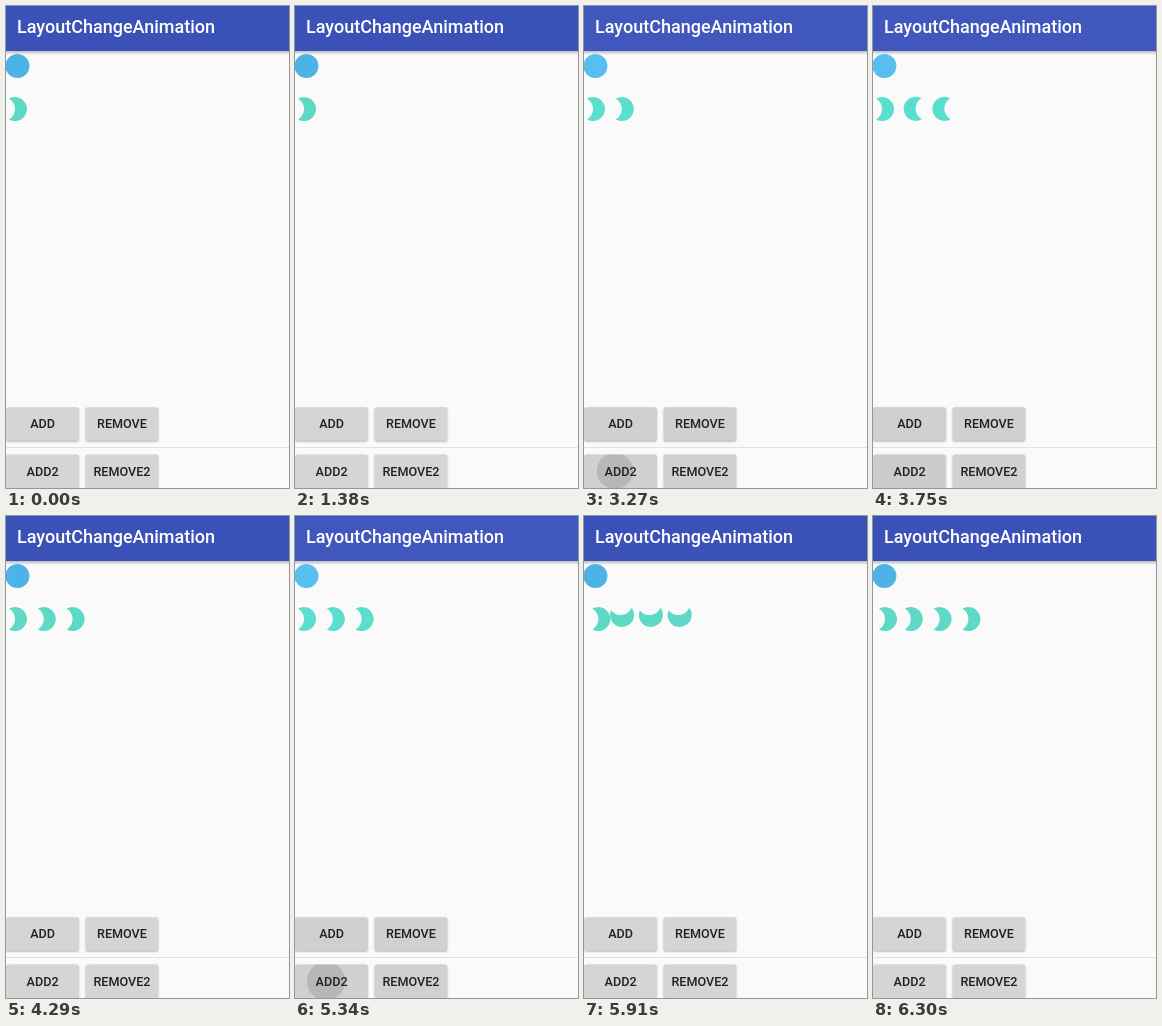
Recreate the animation shown at these times as an HTML page with a canvas. Size 283 by 482 pixels, loop 6.33 s.

```html
<!DOCTYPE html>
<html lang="en">
<head>
<meta charset="utf-8">
<title>LayoutChangeAnimation</title>
<style>
html, body { margin: 0; width: 100%; height: 100%; overflow: hidden; background: #fafafa; }
canvas { display: block; width: 283px; height: 482px; }
</style>
</head>
<body>
<canvas id="stage"></canvas>
<script>
const W = 283, H = 482, LOOP = 6330;
const CELL = 28.8, LEFT = -3, ROW_Y = 103, R = 12;
const MOVE = 600, NUDGE_FROM = 300, NUDGE_TO = 840, NUDGE = 15;

// Each tap adds one moon at the front of the row.
const taps = [
  { at: 1611, on: 1410, off: 2010 },
  { at: 3450, on: 3270, off: 3870 },
  { at: 5515, on: 5280, off: 5910 }
];
const calm = { bar: '#3a52b8', ball: '#4db3e6', moon: 'rgb(54,209,184)', button: '#d5d5d5' };
const bright = { bar: '#4057be', ball: '#56bff0', moon: 'rgb(50,215,195)', button: '#d0d0d0' };

const canvas = document.getElementById('stage');
const ctx = canvas.getContext('2d');
const dpr = window.devicePixelRatio || 1;
canvas.width = W * dpr;
canvas.height = H * dpr;

const clamp = v => Math.max(0, Math.min(1, v));
const decelerate = t => 1 - (1 - t) * (1 - t);
const triangle = t => 1 - Math.abs(2 * t - 1);

function disc(x, y, r, color) {
  ctx.fillStyle = color;
  ctx.beginPath();
  ctx.arc(x, y, r, 0, Math.PI * 2);
  ctx.fill();
}

function label(text, x, y, size, color, align) {
  ctx.font = '500 ' + size + 'px Roboto, sans-serif';
  ctx.textAlign = align;
  ctx.fillStyle = color;
  ctx.fillText(text, x, y);
}

// Crescent whose full circle is centred on (x, y), open to the left.
function crescent(x, y) {
  const a = Math.PI / 3;
  ctx.beginPath();
  ctx.arc(x, y, R, -2 * a, 2 * a);
  ctx.arc(x - R, y, R, a, -a, true);
  ctx.fill();
}

// The cell's right edge jumps ahead while its left edge travels,
// so the pivot sits in the middle of a shrinking cell.
function slidingMoon(index, f) {
  const left = LEFT + CELL * (index - 1 + f);
  const pivot = (left + LEFT + CELL * (index + 1)) / 2;
  ctx.save();
  ctx.translate(pivot, ROW_Y);
  ctx.rotate(triangle(f) * Math.PI * 2);
  crescent(left + R - pivot, 0);
  ctx.restore();
}

function drawMoons(t, color) {
  const done = taps.filter(p => t >= p.at);
  const count = 1 + done.length;
  const age = done.length ? t - done[done.length - 1].at : Infinity;
  const f = decelerate(clamp(age / MOVE));
  const shift = NUDGE * triangle(clamp((age - NUDGE_FROM) / (NUDGE_TO - NUDGE_FROM)));
  ctx.save();
  ctx.beginPath();
  ctx.rect(0, ROW_Y - CELL / 2, W, CELL);
  ctx.clip();
  ctx.globalAlpha = 0.8;
  ctx.fillStyle = color;
  crescent(LEFT + R + shift, ROW_Y);
  for (let i = 1; i < count; i++) slidingMoon(i, f);
  ctx.restore();
}

function drawRipple(t) {
  for (const p of taps) {
    const age = t - p.at;
    if (age < -200 || age > 400) continue;
    const grow = clamp((age + 200) / 180);
    const fade = 1 - clamp((age - 120) / 260);
    const alpha = (0.13 - 0.06 * grow) * fade;
    disc(31, 465, 14 + 36 * grow, 'rgba(0,0,0,' + alpha + ')');
  }
}

function button(text, x, y, color, t) {
  const w = 72.5, h = 33.5;
  const shape = () => {
    ctx.beginPath();
    ctx.roundRect(x, y, w, h, 2);
  };
  ctx.save();
  ctx.shadowColor = 'rgba(0,0,0,0.28)';
  ctx.shadowBlur = 2 * dpr;
  ctx.shadowOffsetY = dpr;
  ctx.fillStyle = color;
  shape();
  ctx.fill();
  ctx.restore();
  if (text === 'ADD2') {
    ctx.save();
    shape();
    ctx.clip();
    drawRipple(t);
    ctx.restore();
  }
  label(text, x + w / 2, y + 21, 12.6, '#212121', 'center');
}

function draw(t) {
  const c = taps.some(p => t >= p.on && t < p.off) ? bright : calm;
  ctx.setTransform(dpr, 0, 0, dpr, 0, 0);
  ctx.fillStyle = '#fafafa';
  ctx.fillRect(0, 0, W, H);

  const shade = ctx.createLinearGradient(0, 45, 0, 49);
  shade.addColorStop(0, 'rgba(0,0,0,0.25)');
  shade.addColorStop(1, 'rgba(0,0,0,0)');
  ctx.fillStyle = shade;
  ctx.fillRect(0, 45, W, 4);
  ctx.fillStyle = c.bar;
  ctx.fillRect(0, 0, W, 45);
  label('LayoutChangeAnimation', 11, 27, 18, '#fff', 'left');

  disc(11.4, 60, R, c.ball);
  drawMoons(t, c.moon);

  ctx.fillStyle = '#e2e2e2';
  ctx.fillRect(0, 441, W, 1);
  button('ADD', 0.3, 401.3, c.button, t);
  button('REMOVE', 79.7, 401.3, c.button, t);
  button('ADD2', 0.3, 448.5, c.button, t);
  button('REMOVE2', 79.7, 448.5, c.button, t);
}

const start = performance.now();
function tick() {
  draw((performance.now() - start) % LOOP);
  requestAnimationFrame(tick);
}
tick();
</script>
</body>
</html>
```
